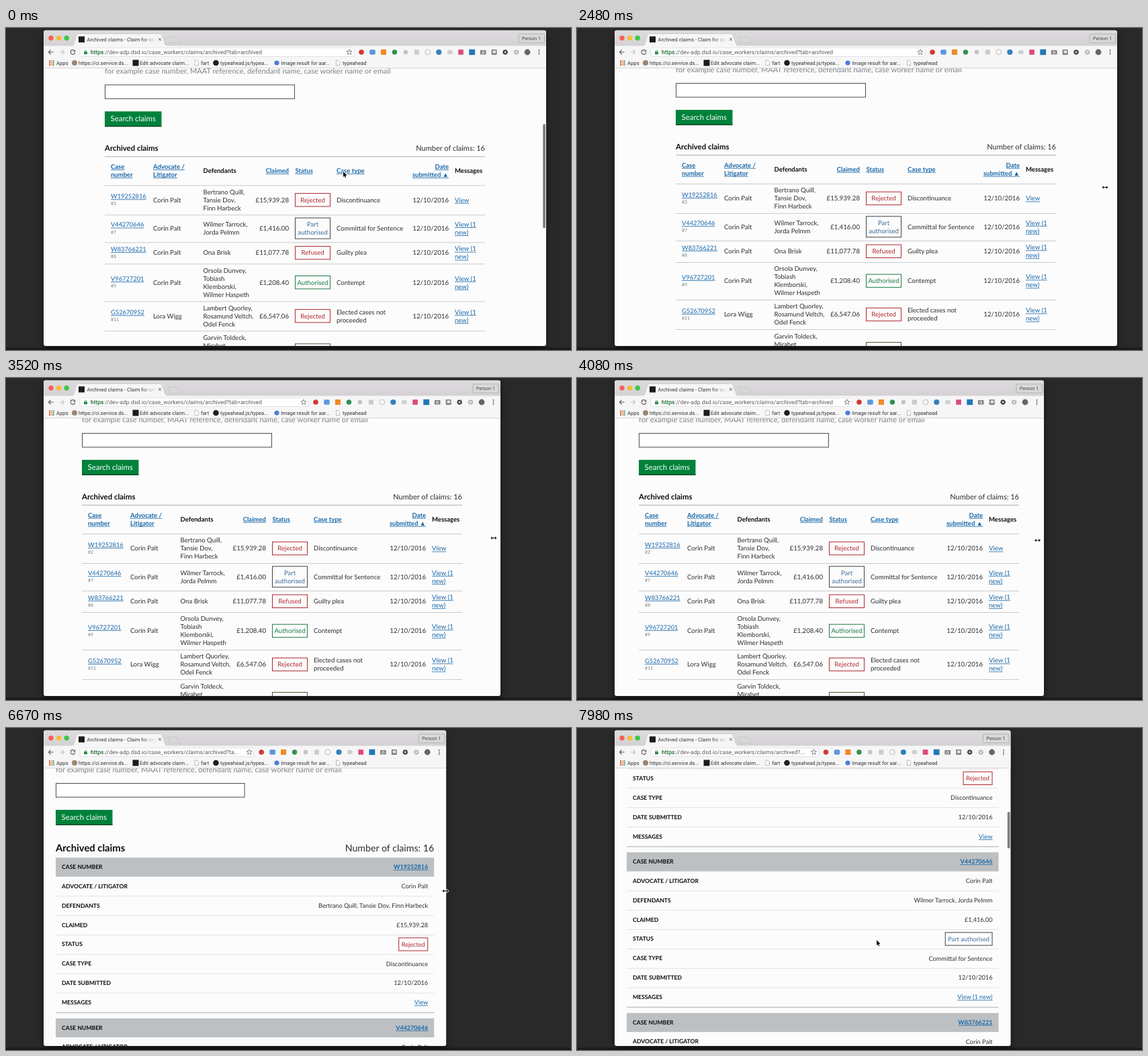
These frames come from a looping animation (841x480 px, 8 s). An HTML page with a canvas:

```html
<!DOCTYPE html>
<html lang="en">
<head>
<meta charset="utf-8">
<title>Archived claims</title>
<style>
  html, body { margin: 0; width: 100%; height: 100%; overflow: hidden; background: #292929; }
  canvas { display: block; width: 841px; height: 480px; }
</style>
</head>
<body>
<canvas id="stage"></canvas>
<script>
const W = 841, H = 480, LOOP = 8000;
const LEFT = 56, TOP = 3.6, BOTTOM = 474, PAGE_TOP = 60;
const canvas = document.getElementById('stage');
const ctx = canvas.getContext('2d');
const dpr = window.devicePixelRatio || 1;
canvas.width = Math.round(W * dpr);
canvas.height = Math.round(H * dpr);

const INK = '#2b2d2e', DARK = '#0b0c0c', LINK = '#1766a8', GREY = '#7a8083';
const RED = '#b0282d', GREEN = '#1d7a45', BLUE = '#3b6c9c', CHROME = '#f7f6f7';
const PAGE = 'Lato, "Open Sans", sans-serif', UI = 'Roboto, "Liberation Sans", sans-serif';

// Screen updates happen only at these moments.
const TICKS = [0, 150, 330, 520, 710, 890, 1070, 1220, 1400,
  2480, 2630, 2850, 3070, 3290, 3520, 3730, 3900, 4080, 4320, 4530, 4730, 4970,
  6670, 6850, 7030, 7200, 7380, 7830, 7980];

const EDGE = [[2480, 804], [3520, 736], [4080, 695], [4730, 661], [4970, 656], [6640, 656], [7030, 645.5]];
const CURSOR_X = [[330, 502], [1070, 806], [1220, 804], [1400, 804], [2480, 786], [3520, 726],
  [4080, 685.5], [4970, 654], [6670, 654], [7030, 645], [7380, 446]];
const CURSOR_Y = [[330, 214], [1070, 236], [1400, 237.5], [2480, 237.5], [3520, 238.5], [4080, 242],
  [7030, 243], [7380, 316]];
const SCROLL = [[150, -2.3], [520, 0], [7380, 0], [7830, 110], [7980, 247.5]];
const BAR = [[520, 1], [890, 0], [7380, 0], [7830, 1]];

const CLAIMS = [
  { id: 'W19252816', no: '#2', by: 'Corin Palt', who: ['Bertrano Quill', 'Tansie Dov', 'Finn Harbeck'], sum: '£15,939.28',
    status: ['Rejected'], color: RED, type: ['Discontinuance'], msg: ['View'], mid: 254, end: 276 },
  { id: 'V44270646', no: '#7', by: 'Corin Palt', who: ['Wilmer Tarrock', 'Jorda Pelmm'], sum: '£1,416.00',
    status: ['Part', 'authorised'], color: BLUE, frame: '#3f4443', type: ['Committal for Sentence'],
    msg: ['View (1', 'new)'], mid: 296.3, end: 317 },
  { id: 'W83766221', no: '#8', by: 'Corin Palt', who: ['Ona Brisk'], sum: '£11,077.78',
    status: ['Refused'], color: RED, type: ['Guilty plea'], msg: ['View (1', 'new)'], mid: 332.8, end: 349 },
  { id: 'V96727201', no: '#9', by: 'Corin Palt', who: ['Orsola Dunvey', 'Tobiash Klemborski', 'Wilmer Haspeth'],
    lines: ['Orsola Dunvey,', 'Tobiash', 'Klemborski,', 'Wilmer Haspeth'], sum: '£1,208.40',
    status: ['Authorised'], color: GREEN, type: ['Contempt'], msg: ['View (1', 'new)'], mid: 376.9, end: 405 },
  { id: 'G52670952', no: '#11', by: 'Lora Wigg', who: ['Lambert Quorley', 'Rosamund Veltch', 'Odel Fenck'], sum: '£6,547.06',
    status: ['Rejected'], color: RED, type: ['Elected cases not', 'proceeded'], msg: ['View (1', 'new)'], mid: 427, end: 449 }
];

function at(track, t) {
  if (t <= track[0][0]) return track[0][1];
  for (let i = 1; i < track.length; i++) {
    const [t1, v1] = track[i], [t0, v0] = track[i - 1];
    if (t <= t1) return v0 + (v1 - v0) * (t - t0) / (t1 - t0);
  }
  return track[track.length - 1][1];
}

function rect(x, y, w, h, fill) {
  ctx.fillStyle = fill;
  ctx.fillRect(x, y, w, h);
}

function round(x, y, w, h, r, fill, stroke) {
  ctx.beginPath();
  ctx.roundRect(x, y, w, h, r);
  if (fill) { ctx.fillStyle = fill; ctx.fill(); }
  if (stroke) { ctx.strokeStyle = stroke; ctx.lineWidth = 0.8; ctx.stroke(); }
}

function disc(x, y, r, fill) {
  ctx.beginPath();
  ctx.arc(x, y, r, 0, Math.PI * 2);
  ctx.fillStyle = fill;
  ctx.fill();
}

function path(points, fill, stroke, width = 1, closed = true) {
  ctx.beginPath();
  points.forEach(([x, y], i) => i ? ctx.lineTo(x, y) : ctx.moveTo(x, y));
  if (closed) ctx.closePath();
  if (stroke) { ctx.strokeStyle = stroke; ctx.lineWidth = width; ctx.stroke(); }
  if (fill) { ctx.fillStyle = fill; ctx.fill(); }
}

// Text centred vertically on y.
function text(s, x, y, size, { color = INK, bold = false, align = 'left', line = false, face = PAGE } = {}) {
  ctx.font = `${bold ? 'bold ' : ''}${size}px ${face}`;
  ctx.textAlign = align;
  ctx.fillStyle = color;
  const base = y + size * 0.35;
  ctx.fillText(s, x, base);
  if (line) {
    const w = ctx.measureText(s).width;
    ctx.fillRect(align === 'right' ? x - w : x, base + 1.2, w, 0.8);
  }
}

function stack(lines, x, mid, size, style) {
  lines.forEach((s, i) => text(s, x, mid + (i - (lines.length - 1) / 2) * 12, size, style));
}

function frame(x, y, w, h, color) {
  ctx.strokeStyle = color;
  ctx.lineWidth = 1;
  ctx.strokeRect(x, y, w, h);
}

function tabStrip(right) {
  const g = ctx.createLinearGradient(0, TOP, 0, 27);
  g.addColorStop(0, '#dedcde');
  g.addColorStop(1, '#d3d1d3');
  rect(LEFT, TOP, right - LEFT, 27 - TOP, g);
  ['#f9605a', '#f8bc35', '#3dc648'].forEach((c, i) => disc(67 + i * 11.6, 15, 3.7, c));
  path([[98, 27], [101, 25], [105, 11], [107, 9], [230, 9], [232, 11], [237, 25], [240, 27]], CHROME, '#b3b1b3', 0.7);
  path([[241, 13.5], [254, 13.5], [259, 22.5], [245, 22.5]], '#d9d7d9', '#b3b1b3', 0.7);
  rect(108, 12.5, 9, 9, '#1b1b1b');
  const fade = ctx.createLinearGradient(203, 0, 224, 0);
  fade.addColorStop(0, '#3a3a3a');
  fade.addColorStop(1, 'rgba(58,58,58,0)');
  ctx.save();
  ctx.beginPath();
  ctx.rect(119, 9, 104, 16);
  ctx.clip();
  text('Archived claims - Claim for crown', 120.5, 17, 7.6, { color: fade, face: UI });
  ctx.restore();
  path([[226.8, 14.8], [231, 19]], null, '#555', 0.9, false);
  path([[231, 14.8], [226.8, 19]], null, '#555', 0.9, false);
  round(right - 41, 9, 38.5, 13, 2, '#dad8da', '#aaa8aa');
  text('Person 1', right - 36, 15.5, 7.1, { color: '#444', face: UI });
}

function address(right) {
  const full = 'https://dev-adp.dsd.io/case_workers/claims/archived?tab=archived';
  const room = right - 304 - 126;
  ctx.font = `8.5px ${UI}`;
  let s = full;
  for (let n = full.length; ctx.measureText(s).width > room; n--) s = full.slice(0, n) + '...';
  text(s, 126, 36, 8.5, { color: '#5b5b5b', face: UI });
  text('https', 126, 36, 8.5, { color: '#2d8a45', face: UI });
}

function star(x, y) {
  const points = Array.from({ length: 10 }, (_, i) => {
    const a = i * Math.PI / 5 - Math.PI / 2, r = i % 2 ? 1.8 : 4.2;
    return [x + r * Math.cos(a), y + r * Math.sin(a)];
  });
  path(points, null, '#666', 0.8);
}

function gear(x, y, color) {
  for (let i = 0; i < 8; i++) {
    const a = i * Math.PI / 4;
    disc(x + 3.2 * Math.cos(a), y + 3.2 * Math.sin(a), 0.9, color);
  }
  disc(x, y, 3, color);
  disc(x, y, 1.3, CHROME);
}

function extensions(right) {
  const x = i => right - 275 + i * 16.47, y = 36;
  disc(x(0), y, 3.8, '#cf3a32');
  round(x(1) - 4.3, y - 3.7, 8.6, 7.4, 2, '#5b97e0');
  rect(x(2) - 4, y - 4, 8, 8, '#f08a24');
  disc(x(3), y, 3.7, '#2e9150');
  disc(x(4), y, 3.2, '#c2c2c2');
  rect(x(5) - 3.5, y - 3.5, 7, 7, '#cacaca');
  ctx.strokeStyle = '#b8b8b8';
  ctx.lineWidth = 0.9;
  ctx.beginPath();
  ctx.arc(x(6), y, 3.9, 0, Math.PI * 2);
  ctx.stroke();
  disc(x(7), y, 4.1, '#3182bd');
  round(x(8) - 4, y - 3, 8, 6, 2.5, '#cfcfcf');
  rect(x(9) - 4, y - 3.8, 7.6, 7.6, '#dc4a78');
  rect(x(10) - 4.4, y - 4.2, 8.8, 8.4, '#2178b8');
  round(x(11) - 4.3, y - 3, 8.6, 6.6, 1, '#7e7e7e');
  disc(x(11), y + 0.4, 2.1, CHROME);
  disc(x(11), y + 0.4, 1.2, '#7e7e7e');
  round(x(12) - 4, y - 4, 8, 8, 1, '#818181');
  rect(x(12) - 2, y - 2.5, 4.5, 4, '#e5e5e5');
  gear(x(13), y, '#3d3d3d');
  gear(x(14), y, '#b8b8b8');
  disc(x(15), y, 4.4, '#666');
  for (let i = -1; i < 2; i++) disc(right - 10.5, y + i * 3, 0.9, '#555');
}

function page(x, y) {
  path([[x - 2.3, y - 3.6], [x + 0.8, y - 3.6], [x + 2.5, y - 1.7], [x + 2.5, y + 3.6], [x - 2.3, y + 3.6]], '#fff', '#666', 0.8);
}

function toolbar(right) {
  rect(LEFT, 26.5, right - LEFT, PAGE_TOP - 26.5, CHROME);
  const arrow = (x, dir, color) => {
    path([[x - 3.5, 36], [x + 3.5, 36]], null, color, 1.1, false);
    path([[x - dir * 0.4, 32.7], [x - dir * 3.6, 36], [x - dir * 0.4, 39.3]], null, color, 1.1, false);
  };
  arrow(67, 1, '#555');
  arrow(83, -1, '#c3c3c3');
  ctx.beginPath();
  ctx.arc(99.5, 36, 3.3, 0.2, 5.4);
  ctx.strokeStyle = '#555';
  ctx.lineWidth = 1.1;
  ctx.stroke();
  path([[103.2, 32.2], [103.2, 35.5], [100, 35.5]], '#555');
  round(110, 29.7, right - 396, 12.8, 2, '#fff', '#dddbdd');
  round(116, 35.2, 5, 4, 0.6, '#2d8a45');
  ctx.beginPath();
  ctx.arc(118.5, 35, 1.6, Math.PI, 0);
  ctx.strokeStyle = '#2d8a45';
  ctx.stroke();
  address(right);
  star(right - 293, 36);
  extensions(right);

  const hues = ['#d8534b', '#e09a3a', '#4c9a59', '#4c82cc'];
  for (let i = 0; i < 9; i++) rect(64 + i % 3 * 2.8, 48.3 + Math.floor(i / 3) * 2.8, 2, 2, hues[(i + Math.floor(i / 3)) % 4]);
  disc(102, 52, 4, '#9c8670');
  rect(188.5, 47.5, 9, 9, '#1b1b1b');
  page(283.5, 52);
  disc(312.5, 52, 4.3, '#1f1f1f');
  disc(403, 52, 3.6, '#4a7fe0');
  page(494, 52);
  [['Apps', 75], ['https://ci.service.ds...', 108], ['Edit advocate claim...', 199], ['fart', 290],
    ['typeahead.js/typea...', 319], ['Image result for aar...', 409.5], ['typeahead', 501]]
    .forEach(([s, x]) => text(s, x, 52, 7.7, { color: '#333', face: UI }));
  rect(LEFT, PAGE_TOP - 0.6, right - LEFT, 0.8, '#cfcdcf');
}

function searchForm(x, width) {
  text('for example case number, MAAT reference, defendant name, case worker name or email', x, 62, 11.1, { color: GREY });
  rect(x, 82, width / 2, 21.5, '#fff');
  frame(x + 0.5, 82.5, width / 2 - 1, 20.6, '#4a4c4e');
  rect(x, 122, 84.5, 22.8, '#00823b');
  rect(x, 143.6, 84.5, 1.3, '#03431f');
  text('Search claims', x + 42.2, 133, 11.4, { color: '#fff', align: 'center' });
}

function wideTable(x) {
  const head = { color: LINK, bold: true, line: true }, plain = { color: DARK, bold: true };
  const rule = (y, c) => rect(x, y, 566, 1, c);
  text('Archived claims', x, 176.8, 11.4, plain);
  text('Number of claims: 16', x + 566, 176.8, 11, { align: 'right' });
  rule(189, '#adb0b2');
  stack(['Case', 'number'], x + 9, 210.3, 9.5, head);
  stack(['Advocate /', 'Litigator'], x + 72, 210.3, 9.5, head);
  text('Defendants', x + 146.5, 210.3, 9.5, plain);
  text('Claimed', x + 274, 210.3, 9.5, { ...head, align: 'right' });
  text('Status', x + 283.5, 210.3, 9.5, head);
  text('Case type', x + 345, 210.3, 9.5, head);
  stack(['Date', 'submitted ▲'], x + 512, 210.3, 9.5, { ...head, align: 'right' });
  text('Messages', x + 521, 210.3, 9.5, plain);
  rule(232, '#c8cbcc');

  for (const c of CLAIMS) {
    const y = c.mid, lines = c.lines || c.who.map((s, i) => i < c.who.length - 1 ? s + ',' : s);
    text(c.id, x + 9, y - 5.4, 9.3, { color: LINK, line: true });
    text(c.no, x + 9, y + 5.7, 7, { color: GREY });
    text(c.by, x + 72, y, 9.6);
    stack(lines, x + 146.5, y, 9.6);
    text(c.sum, x + 274, y, 9.7, { align: 'right' });
    const h = c.status.length > 1 ? 31 : 19.4;
    frame(x + 283.5, y - h / 2, 52, h, c.frame || c.color);
    stack(c.status, x + 309.6, y, 9.6, { color: c.color, align: 'center' });
    stack(c.type, x + 345, y, 9.6);
    text('12/10/2016', x + 512, y, 9.7, { align: 'right' });
    stack(c.msg, x + 521, y, 9.6, { color: LINK, line: true });
    rule(c.end, '#c8cbcc');
  }
  stack(['Garvin Toldeck,', 'Mirabet'], x + 146.5, 465.5, 9.6);
  frame(x + 283.5, 468.5, 52, 19.4, '#54583a');
}

function cards(x, width) {
  const right = x + width, pitch = 28.86;
  text('Archived claims', x, 179, 14.8, { color: DARK, bold: true });
  text('Number of claims: 16', right, 179, 14.2, { align: 'right' });
  const labels = ['CASE NUMBER', 'ADVOCATE / LITIGATOR', 'DEFENDANTS', 'CLAIMED', 'STATUS', 'CASE TYPE', 'DATE SUBMITTED', 'MESSAGES'];
  CLAIMS.slice(0, 3).forEach((c, n) => {
    const top = 193.3 + n * 239.5;
    const values = [c.id, c.by, c.who.join(', '), c.sum, c.status.join(' '), c.type.join(' '), '12/10/2016', c.msg.join(' ')];
    rect(x, top, width, 28.4, '#bdc0c2');
    labels.forEach((label, i) => {
      const y = top + 13.7 + i * pitch, style = { align: 'right' };
      text(label, x + 9, y, 8.6, { color: DARK, bold: true });
      if (i === 0) Object.assign(style, { color: LINK, bold: true, line: true });
      if (i === 7) Object.assign(style, { color: LINK, line: true });
      if (i === 4) {
        ctx.font = `9.2px ${PAGE}`;
        const w = ctx.measureText(values[i]).width + 8;
        frame(right - 9.5 - w, y - 9.6, w, 19.2, c.frame || c.color);
        text(values[i], right - 13.5, y, 9.2, { color: c.color, align: 'right' });
      } else {
        text(values[i], right - 9, y, i ? 9.2 : 9, style);
      }
      if (i > 0) rect(x, top + 28.2 + i * pitch, width, i < 7 ? 0.8 : 1.6, i < 7 ? '#dcdddf' : '#c6c9cb');
    });
  });
}

function scrollBar(right, scroll, wide, alpha) {
  if (alpha <= 0) return;
  ctx.globalAlpha = alpha;
  if (wide) round(right - 4.8, 143, 3.8, 155.5, 1.9, '#7e7e7e');
  else round(right - 4.8, 125 - (247.5 - scroll) * 0.13, 3.8, 54.5, 1.9, '#7e7e7e');
  ctx.globalAlpha = 1;
}

function pointer(x, y, arrow) {
  ctx.lineJoin = 'round';
  const shape = arrow
    ? [[0, 0], [0, 8], [1.8, 6.4], [3, 9.2], [4.3, 8.6], [3.1, 5.9], [5.6, 5.8]]
    : [[-4.5, 0], [-2, -2.3], [-2, -0.6], [2, -0.6], [2, -2.3], [4.5, 0], [2, 2.3], [2, 0.6], [-2, 0.6], [-2, 2.3]];
  path(shape.map(([a, b]) => [x + a, y + b]), '#111', '#fff', 1.4);
  ctx.lineJoin = 'miter';
}

function draw(now) {
  const clock = now % LOOP;
  const t = TICKS.reduce((last, tick) => tick <= clock ? tick : last, 0);
  const right = at(EDGE, t), scroll = at(SCROLL, t), wide = right > 658;

  ctx.setTransform(dpr, 0, 0, dpr, 0, 0);
  ctx.textRendering = 'geometricPrecision';
  rect(0, 0, W, H, '#292929');
  rect(0, 476.5, W, 3.5, '#1e191d');
  ctx.save();
  ctx.shadowColor = 'rgba(0,0,0,0.5)';
  ctx.shadowBlur = 10 * dpr;
  ctx.shadowOffsetY = 5 * dpr;
  round(LEFT, TOP, right - LEFT, BOTTOM - TOP, 3, '#fcfcfc');
  ctx.restore();

  ctx.save();
  ctx.beginPath();
  ctx.roundRect(LEFT, TOP, right - LEFT, BOTTOM - TOP, 3);
  ctx.clip();
  ctx.save();
  ctx.beginPath();
  ctx.rect(LEFT, PAGE_TOP, right - LEFT, BOTTOM - PAGE_TOP);
  ctx.clip();
  ctx.translate(0, -scroll);
  const x = wide ? Math.floor((LEFT + right) / 2 - 283) : LEFT + 18;
  const width = wide ? 566 : right - 18 - x;
  searchForm(x, width);
  if (wide) wideTable(x);
  else cards(x, width);
  ctx.restore();
  scrollBar(right, scroll, wide, at(BAR, t));
  tabStrip(right);
  toolbar(right);
  ctx.restore();

  pointer(at(CURSOR_X, t), at(CURSOR_Y, t), t < 1220 || t > 7030);
}

const start = performance.now();
function loop() {
  draw(performance.now() - start);
  requestAnimationFrame(loop);
}
loop();
</script>
</body>
</html>
```
